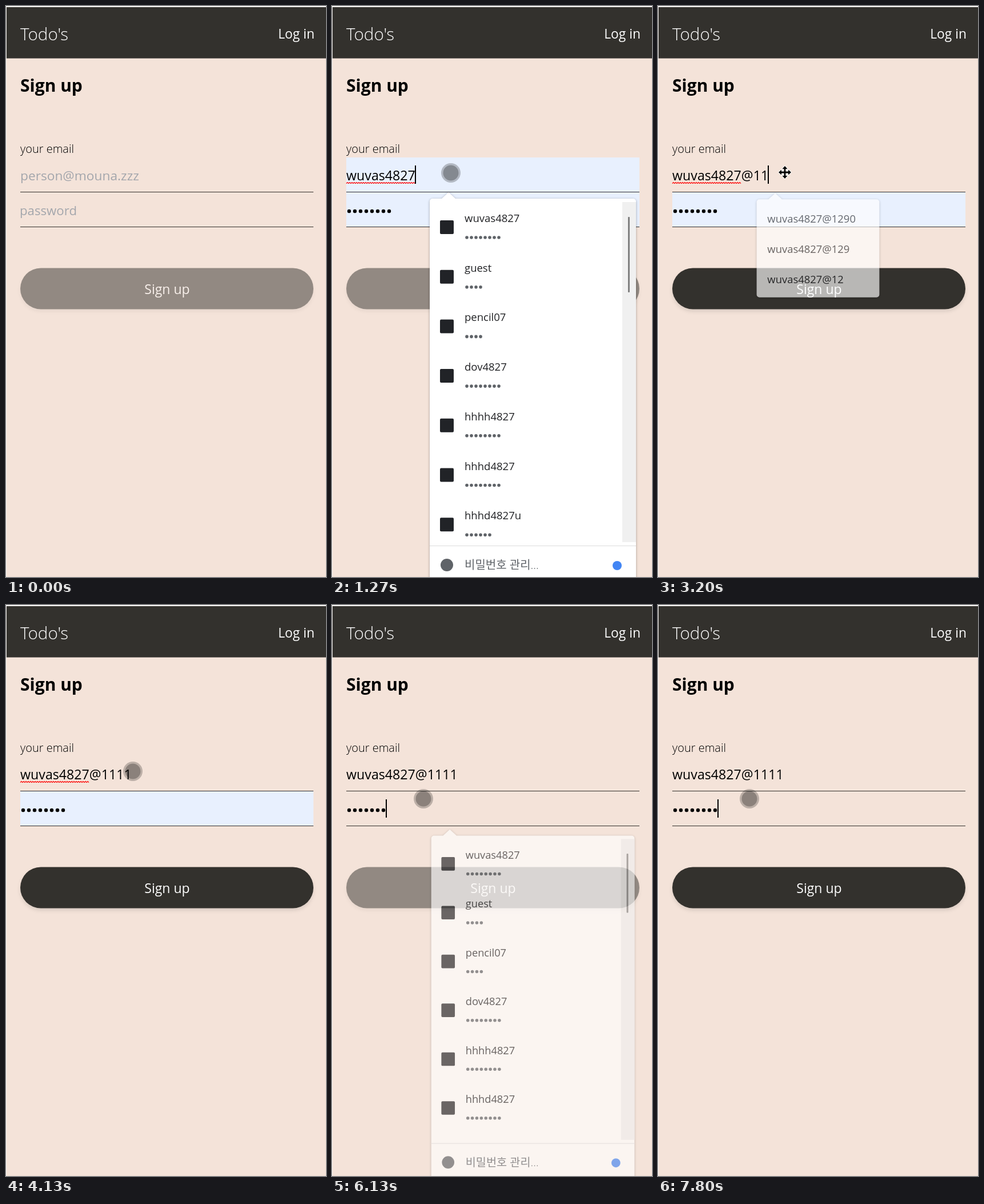
These frames come from a looping animation (560 px wide and 999 px high, 8 s). An HTML page:

```html
<!DOCTYPE html>
<html lang="en">
<head>
<meta charset="utf-8">
<title>Sign up</title>
<style>
  html, body { margin: 0; width: 100%; height: 100%; overflow: hidden; background: #fff; }
  svg { display: block; width: 100%; height: 100%; font-family: "Open Sans", "Noto Sans CJK KR", "Noto Sans", sans-serif; }
  .thin { font-weight: 300; }
  .raised { filter: drop-shadow(0 4px 3px rgba(0, 0, 0, .1)); }
  .sheet { fill: #fff; filter: drop-shadow(0 1px 2px rgba(0, 0, 0, .32)); }
</style>
</head>
<body>
<svg id="stage" viewBox="0 0 560 999"></svg>
<script>
const LOOP = 8000;
const DARK = '#33312d', INK = '#202124', GRAY = '#5f6368', HINT = '#a3a6ac';
const USER = 'wuvas4827';

const stage = document.getElementById('stage');

function add(parent, tag, attrs = {}, text) {
  const node = document.createElementNS(stage.namespaceURI, tag);
  for (const key in attrs) node.setAttribute(key, attrs[key]);
  if (text !== undefined) node.textContent = text;
  parent.append(node);
  return node;
}
const rect = (p, x, y, width, height, fill, more) => add(p, 'rect', { x, y, width, height, fill, ...more });
const label = (p, x, y, size, fill, text, more) => add(p, 'text', { x, y, 'font-size': size, fill, ...more }, text);
const disc = (p, cx, cy, r, fill, more) => add(p, 'circle', { cx, cy, r, fill, ...more });
const group = (p, attrs) => add(p, 'g', attrs);
const show = (node, on) => { node.style.display = on ? '' : 'none'; };
const dotRow = (p, n, x, y, gap, r, fill) =>
  Array.from({ length: n }, (_, i) => disc(p, x + gap * i, y, r, fill));

// Page
rect(stage, 0, 0, 560, 999, '#fbf8f6');
rect(stage, 1, 2, 559, 997, '#f4e3d9');
rect(stage, 1, 2, 559, 89.6, DARK);
label(stage, 25, 60, 29.6, '#fff', "Todo's", { class: 'thin' });
label(stage, 540, 57, 22.8, '#fff', 'Log in', { 'text-anchor': 'end' });
label(stage, 25, 150, 30, '#000', 'Sign up', { 'font-weight': 700 });
label(stage, 25, 257, 20, '#000', 'your email', { class: 'thin' });

// Fields
const mailFill = rect(stage, 25, 265, 513, 60, '#e8f0fe');
const passFill = rect(stage, 25, 326, 513, 60, '#e8f0fe');
rect(stage, 25, 325, 513, 1, DARK);
rect(stage, 25, 386, 513, 1, DARK);
const mailHint = label(stage, 25, 305, 22.7, HINT, 'person@mouna.zzz');
const passHint = label(stage, 24, 366, 22.2, HINT, 'password');
const mailText = label(stage, 25, 305, 23.2, '#000', '');
const passDots = dotRow(stage, 8, 30, 359, 10, 3.2, '#000');
const squiggle = add(stage, 'path', {
  d: 'M25 310.5' + 'l2 -2l2 2'.repeat(30), fill: 'none', stroke: '#f00', 'stroke-width': 1.1
});
const caret = rect(stage, 0, 0, 2, 32, '#000');

// Button
const button = group(stage);
rect(button, 25, 458.6, 513, 71.8, DARK, { rx: 35.9, class: 'raised' });
label(button, 282, 504, 23, '#fff', 'Sign up', { 'text-anchor': 'middle' });

// Popups
function popup(top, width, bottom) {
  const node = group(stage);
  const right = 171 + width;
  add(node, 'path', {
    class: 'sheet',
    d: `M176 ${top}H192L204 ${top - 11}L216 ${top}H${right - 5}a5 5 0 0 1 5 5V${bottom - 5}` +
       `a5 5 0 0 1 -5 5H176a5 5 0 0 1 -5 -5V${top + 5}a5 5 0 0 1 5 -5Z`
  });
  const cx = 171 + width / 2, cy = (top + bottom) / 2;
  const setAlpha = a => {
    show(node, a > 0);
    const s = 0.958 + 0.042 * a;
    node.setAttribute('opacity', a);
    node.setAttribute('transform', `translate(${cx} ${cy}) scale(${s}) translate(${-cx} ${-cy})`);
  };
  return { node, setAlpha };
}

function mailPopup(width, endings) {
  const p = popup(337, width, 349 + 54 * endings.length);
  endings.forEach((end, i) => label(p.node, 190, 378 + 53.8 * i, 18.7, INK, USER + '@' + end));
  return p;
}

const accounts = [
  [USER, 8], ['guest', 4], ['pencil07', 4], ['dov4827', 8],
  ['hhhh4827', 8], ['hhhd4827', 8], ['hhhd4827u', 6]
];

function loginPopup(top, listEnd, rows, thumb) {
  const p = popup(top, 361, 1021), g = p.node;
  accounts.slice(0, rows).forEach(([name, dots], i) => {
    const y = top + 86.7 * i;
    rect(g, 189, y + 38, 24, 24, '#212327', { rx: 2 });
    label(g, 232, y + 41, 18.5, INK, name);
    dotRow(g, dots, 236, y + 68, 8, 2.8, GRAY);
  });
  rect(g, 508, top + 6, 24, listEnd - top - 6, '#f0f0f0');
  rect(g, 518, top + 32, 3, thumb, '#808080', { rx: 1 });
  rect(g, 171, listEnd + 6, 361, 1, '#dcdcdc');
  disc(g, 201, listEnd + 40, 11, GRAY);
  label(g, 232, listEnd + 47, 20, GRAY, '비밀번호 관리...', { class: 'thin' });
  disc(g, 499, listEnd + 41, 8, '#4285f4');
  return p;
}

const popups = {
  few: mailPopup(218, ['1290', '129', '12']),
  mails: mailPopup(289, ['nuvom.zzz', 'pulma.zzz', 'nuvom.zz', 'nuvom.zzzdd', 'uu', '1290']),
  userList: loginPopup(337, 938, 7, 132),
  passList: loginPopup(399, 939, 6, 105)
};

// Pointers
const touch = group(stage);
disc(touch, 0, 0, 17, '#000', { opacity: 0.23 });
disc(touch, 0, 0, 13.5, '#000', { opacity: 0.26 });

const arm = [[-1.4, -1.4], [-1.4, -6], [-4.5, -6], [0, -11], [4.5, -6], [1.4, -6]];
const crossPoints = [];
for (let k = 0, pts = arm; k < 4; k++, pts = pts.map(([x, y]) => [-y, x])) crossPoints.push(...pts);
const cross = add(stage, 'polygon', {
  points: crossPoints.join(' '), fill: '#000', stroke: '#fff',
  'stroke-width': 1.6, 'paint-order': 'stroke', transform: 'translate(222 291)'
});

// Each step changes part of the state; the rest carries over.
const steps = [
  [0, { mail: '', dots: 0, mailBlue: false, passBlue: false, squiggle: false, caret: '',
        touch: null, cross: false, few: 0, mails: 0, userList: 0, passList: 0 }],
  [270, { touch: [305, 456] }],
  [330, { touch: null }],
  [470, { touch: [291, 409] }],
  [530, { touch: [255, 355] }],
  [600, { touch: [222, 309] }],
  [670, { touch: [208, 292], mail: USER, dots: 8, mailBlue: true, passBlue: true }],
  [1130, { squiggle: true, caret: 'mail', userList: 0.35 }],
  [1200, { userList: 0.75 }],
  [1270, { userList: 1 }],
  [1400, { touch: [215, 292] }],
  [1470, { touch: [222, 291] }],
  [1670, { caret: '' }],
  [2130, { touch: null, cross: true }],
  [2200, { caret: 'mail' }],
  [2400, { mail: USER + '@', mailBlue: false, userList: 0.75, mails: 0.5 }],
  [2470, { userList: 0.46, mails: 1 }],
  [2530, { userList: 0.15 }],
  [2600, { userList: 0 }],
  [2800, { mail: USER + '@1', mails: 0.65, few: 1 }],
  [2930, { mails: 0.3 }],
  [3000, { mails: 0 }],
  [3200, { mail: USER + '@11', few: 0.65 }],
  [3270, { few: 0.3 }],
  [3330, { few: 0 }],
  [3400, { mail: USER + '@111' }],
  [3600, { mail: USER + '@1111' }],
  [4130, { caret: '', cross: false, touch: [222, 291] }],
  [4200, { touch: [196, 262] }],
  [4270, { touch: [160, 259] }],
  [4330, { touch: [143, 284] }],
  [4400, { touch: [150, 320] }],
  [4470, { touch: [160, 339] }],
  [4670, { squiggle: false, caret: 'pass' }],
  [4800, { passList: 0.35 }],
  [4870, { passList: 0.75 }],
  [4930, { passList: 1 }],
  [5200, { caret: '' }],
  [5270, { touch: [159, 331] }],
  [5330, { touch: [158, 323] }],
  [5470, { touch: [159, 332] }],
  [5530, { touch: [160, 339] }],
  [5670, { caret: 'pass' }],
  [6130, { dots: 7, passBlue: false, passList: 0.65 }],
  [6200, { passList: 0.3 }],
  [6270, { passList: 0 }],
  [6530, { dots: 6 }],
  [6600, { dots: 4 }],
  [6670, { dots: 2 }],
  [6730, { dots: 0, caret: '', passList: 0.5 }],
  [6800, { passList: 1 }],
  [6930, { dots: 1, caret: 'pass', passList: 0.65 }],
  [7000, { passList: 0.3 }],
  [7070, { dots: 2, passList: 0 }],
  [7130, { dots: 3 }],
  [7270, { dots: 4 }],
  [7470, { dots: 5 }],
  [7600, { dots: 6 }],
  [7670, { dots: 7 }],
  [7800, { dots: 8 }]
];

let carried = {};
const states = steps.map(([at, change]) => ({ at, ...(carried = { ...carried, ...change }) }));

function draw(s) {
  mailText.textContent = s.mail;
  show(mailHint, !s.mail);
  show(passHint, !s.dots);
  show(mailFill, s.mailBlue);
  show(passFill, s.passBlue);
  show(squiggle, s.squiggle);
  passDots.forEach((dot, i) => show(dot, i < s.dots));
  button.setAttribute('opacity', s.mail.includes('@') && s.dots >= 8 ? 1 : 0.5);

  show(caret, s.caret);
  const inMail = s.caret === 'mail';
  caret.setAttribute('x', inMail ? 24 + Math.round(mailText.getComputedTextLength()) : 24 + 10 * s.dots);
  caret.setAttribute('y', inMail ? 279 : 340);

  for (const id in popups) popups[id].setAlpha(s[id]);
  show(cross, s.cross);
  show(touch, s.touch);
  if (s.touch) touch.setAttribute('transform', `translate(${s.touch})`);
}

const start = performance.now();
let current;
function tick() {
  const t = (performance.now() - start) % LOOP;
  const state = states.findLast(s => s.at <= t) || states[0];
  if (state !== current) draw(current = state);
  requestAnimationFrame(tick);
}
tick();
</script>
</body>
</html>
```
